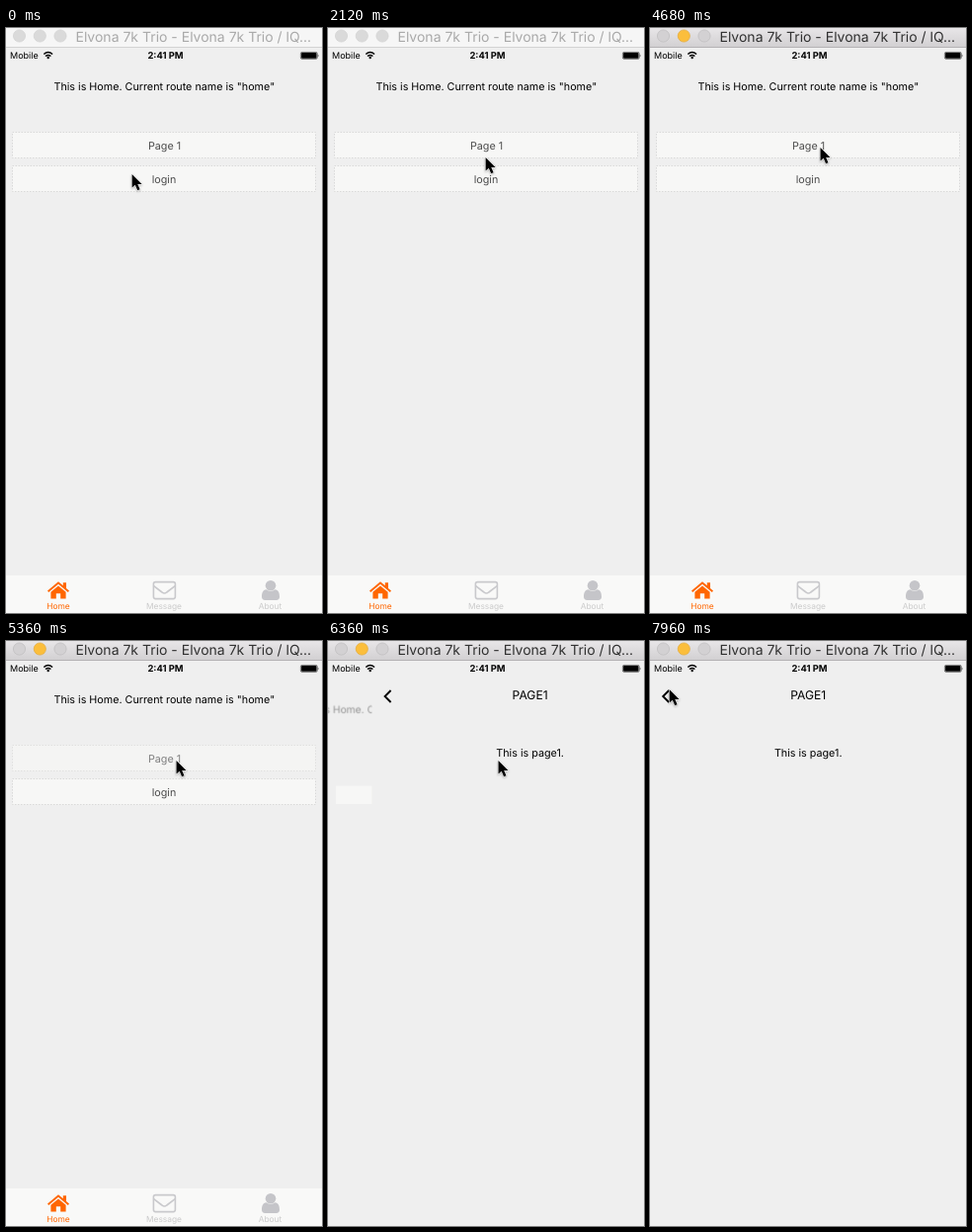
Write an HTML page that moves like this. It is 320 px wide and 592 px high and loops after 8 s.

```html
<!DOCTYPE html>
<html lang="en">
<head>
<meta charset="utf-8">
<title>Page transition</title>
<style>
  html, body { margin: 0; width: 100%; height: 100%; overflow: hidden; background: #efefef; }
  svg { display: block; width: 320px; height: 592px; }
  text { font-family: Inter, Roboto, sans-serif; font-size: 10.75px; text-rendering: geometricPrecision; white-space: pre; }
  .mid { text-anchor: middle; }
  .box { fill: #f7f7f6; stroke: #d6d6d6; stroke-width: .9; stroke-dasharray: 1.5 1.5; }
  .tab { font-size: 8.4px; text-anchor: middle; fill: #cbcbcb; }
  #cursor { filter: drop-shadow(0 1px 1px rgba(0, 0, 0, .3)); }
</style>
</head>
<body>
<svg viewBox="0 0 320 592" width="320" height="592">
  <defs>
    <linearGradient id="chrome" x2="0" y2="1">
      <stop stop-color="#e8e6e8"/>
      <stop offset="1" stop-color="#d2d0d2"/>
    </linearGradient>
  </defs>
  <rect width="320" height="592" fill="#efefef"/>

  <rect id="loginBox" class="box"/>
  <g id="home">
    <rect id="tabBar" y="554" width="320" height="38" fill="#f9f9f8"/>
    <text class="mid" x="160.3" y="62.5">This is Home. Current route name is "home"</text>
    <g id="pageButton">
      <rect id="pageBox" class="box" x="6.5" y="105.5" width="307" height="26"/>
      <text class="mid" x="160.5" y="122.5" fill="#4c4c4c">Page 1</text>
    </g>
    <text class="mid" x="160" y="157" fill="#4c4c4c">login</text>

    <g fill="#ff6600">
      <path d="M42 569.6 53 560.2 57.8 564.3V561.2H61V567L64 569.6 62.8 571 53 562.8 43.2 571Z"/>
      <path d="M45.4 570.8 53 564.4 60.6 570.8V577.4H55.2V572.2H50.8V577.4H45.4Z"/>
    </g>
    <text class="tab" x="53" y="588" style="fill:#ff6600">Home</text>
    <g fill="none" stroke="#c9c9cc" stroke-width="1.6">
      <rect x="149.4" y="560.6" width="22" height="17" rx="2"/>
      <path d="M149.6 564.6 158 571Q160.4 573 162.8 571L171.2 564.6"/>
    </g>
    <text class="tab" x="160" y="588">Message</text>
    <g fill="#c5c5c9">
      <circle cx="268" cy="564.2" r="5.3"/>
      <path d="M263.6 568.2Q268 571.8 272.4 568.2C276 568.6 277 572 277 575.6Q277 579 273.6 579H262.4Q259 579 259 575.6C259 572 260 568.6 263.6 568.2Z"/>
    </g>
    <text class="tab" x="267.5" y="588">About</text>
  </g>

  <g id="page">
    <rect y="20" width="320" height="572" fill="#efefef"/>
    <path d="M19.2 50 13.2 56 19.2 62" fill="none" stroke="#000" stroke-width="1.9"/>
    <text class="mid" x="160.2" y="59.2" style="font-size:12.1px">PAGE1</text>
    <text class="mid" x="160.2" y="117">This is page1.</text>
  </g>

  <text x="4" y="31.2" style="font-size:9px">Mobile</text>
  <g fill="none" stroke="#000" stroke-width="1.4">
    <path d="M38.3 26.6Q42.7 22.4 47.1 26.6M40 28.6Q42.7 26.2 45.4 28.6"/>
    <circle cx="42.7" cy="30" r=".5"/>
  </g>
  <text class="mid" x="161.5" y="31.3" style="font-size:9.4px;font-weight:700">2:41 PM</text>
  <rect x="298.4" y="24.4" width="16.8" height="7" rx="1.4" fill="none" stroke="#000" stroke-width=".5"/>
  <rect x="299.1" y="25" width="15.4" height="5.8" rx=".7"/>
  <path d="M315.8 26.4Q317.2 27.9 315.8 29.4Z"/>

  <rect id="bar" width="320" height="19"/>
  <rect id="barLine" y="19" width="320" height="1"/>
  <g id="lights" stroke-width=".7">
    <circle cx="13.5" cy="8" r="6.1"/>
    <circle cx="34.3" cy="8" r="6.1"/>
    <circle cx="55" cy="8" r="6.1"/>
  </g>
  <text id="title" x="70.5" y="13.6" style="font-size:14px">Elvona 7k Trio - Elvona 7k Trio / lQ...</text>

  <path id="cursor" d="M0 0V13.6L3.2 10.8 5.6 16.2 8 15.2 5.7 10H10Z" stroke="#fff" stroke-width="1" paint-order="stroke"/>
</svg>
<script>
const LOOP = 8000, W = 320, MID_X = 160, MID_Y = 306;
const PRESS = 5200, PUSH = 5500, ACTIVE = 4680;
const $ = id => document.getElementById(id);
const clamp = v => Math.max(0, Math.min(1, v));
const ease = u => u * u * (3 - 2 * u);
const set = (el, attrs) => { for (const k in attrs) el.setAttribute(k, attrs[k]); };

// time, x, y of the pointer tip
const path = [
  [0, 127.6, 148], [1160, 127.6, 148], [1500, 112.6, 187], [1700, 122, 180],
  [2120, 159.6, 131], [2760, 160.5, 131], [3240, 172.5, 121], [6640, 172.5, 121],
  [7220, 92, 69], [7880, 19.6, 49], [LOOP, 19.6, 49]
];

function pointer(t) {
  let i = 1;
  while (i < path.length - 1 && path[i][0] < t) i++;
  const [t0, x0, y0] = path[i - 1], [t1, x1, y1] = path[i];
  const u = ease(clamp((t - t0) / (t1 - t0)));
  return [x0 + (x1 - x0) * u, y0 + (y1 - y0) * u];
}

// Navigation progress: decaying approach, settled after 1.6 s
function push(t) {
  if (t < PUSH + 40) return 0;
  const s = Math.min((t - PUSH) / 1000, 1.6), k = 2.05;
  return (1 - Math.exp(-k * s)) / (1 - Math.exp(-k * 1.6));
}

function drawWindow(active) {
  set($('bar'), { fill: active ? 'url(#chrome)' : '#f6f6f6' });
  set($('barLine'), { fill: active ? '#b4b2b4' : '#d3d3d3' });
  set($('title'), { fill: active ? '#303030' : '#a9a9a9' });
  [...$('lights').children].forEach((c, i) => {
    const on = active && i === 1;
    set(c, {
      fill: on ? '#fbbe3c' : active ? '#d3d1d3' : '#dadada',
      stroke: on ? '#e3a938' : active ? '#bebcbe' : '#d2d2d2'
    });
  });
}

function drawLoginBox(p, scale) {
  const top = MID_Y + (139.5 - MID_Y) * scale;
  set($('loginBox'), {
    x: p ? 8 : 6.5, y: top,
    width: p ? 305 : 307, height: (p ? 165 : 165.5) - top,
    'stroke-opacity': p ? 0 : 1
  });
}

function draw(t) {
  const p = push(t), scale = 1 - 0.05 * p;
  drawWindow(t >= ACTIVE);
  drawLoginBox(p, scale);
  set($('home'), {
    transform: `translate(${MID_X - 96 * p} ${MID_Y}) scale(${scale}) translate(${-MID_X} ${-MID_Y})`,
    opacity: 1 - 0.7 * p
  });
  set($('pageButton'), { opacity: 1 - 0.7 * ease(clamp((t - PRESS) / 340)) });
  const backing = p ? 'hidden' : 'visible';
  set($('tabBar'), { visibility: backing });
  set($('pageBox'), { visibility: backing });
  set($('page'), {
    transform: `translate(${W * (1 - p)} 0)`,
    visibility: p ? 'visible' : 'hidden'
  });
  set($('cursor'), { transform: `translate(${pointer(t).join(' ')})` });
}

const start = performance.now();
function tick() {
  draw((performance.now() - start) % LOOP);
  requestAnimationFrame(tick);
}
draw(0);
requestAnimationFrame(tick);
</script>
</body>
</html>
```
